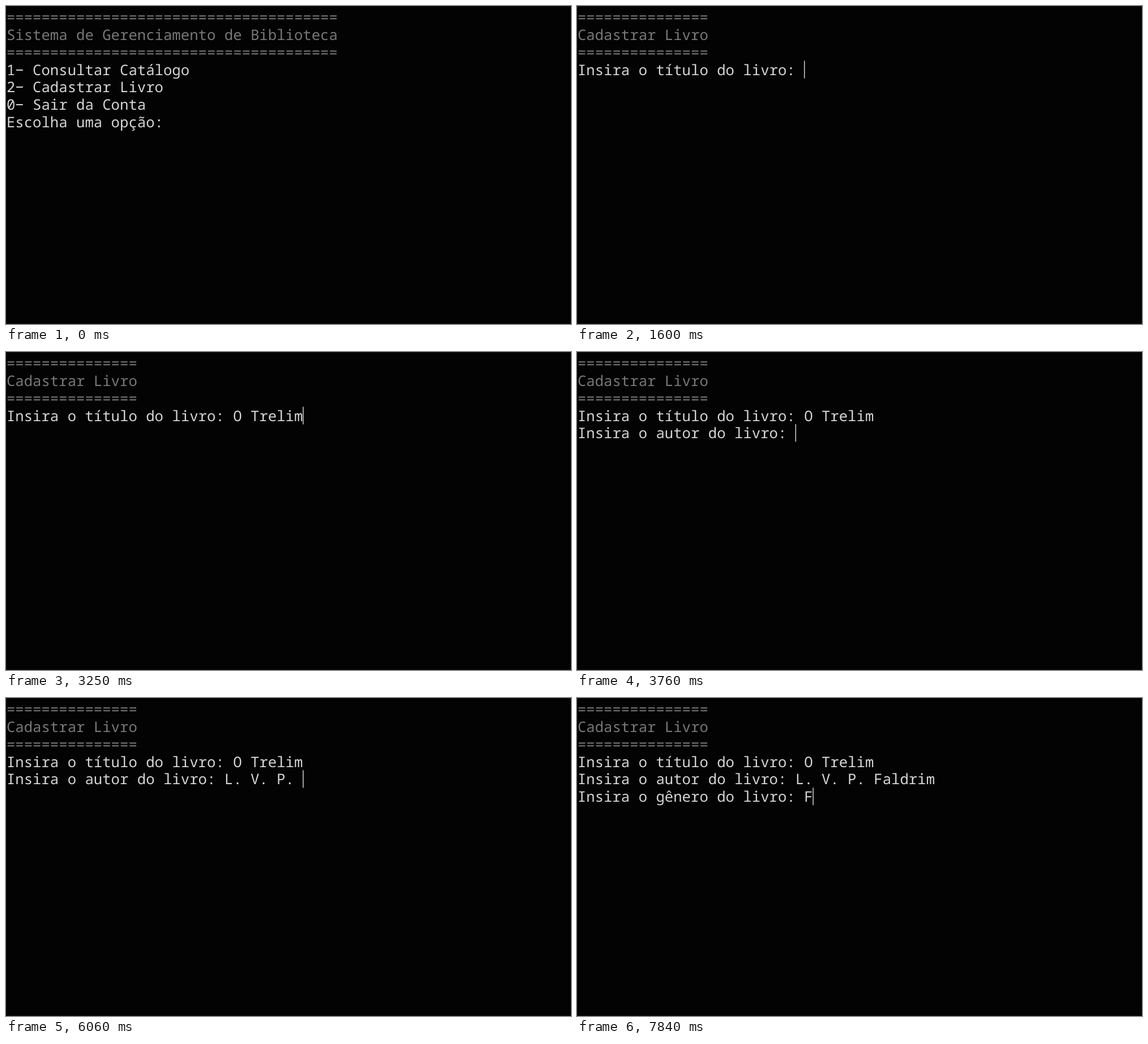
These frames come from a looping animation (998x561 px, 8 s). An HTML page:

```html
<!DOCTYPE html>
<html lang="pt">
<head>
<meta charset="utf-8">
<title>Biblioteca</title>
<style>
  html, body { margin: 0; width: 100%; height: 100%; overflow: hidden; background: #030303; }
  svg { display: block; width: 100%; height: 100%; }
  text {
    font: 25.667px "Noto Sans Mono", "DejaVu Sans Mono", monospace;
    white-space: pre;
    text-rendering: geometricPrecision;
    font-variant-ligatures: none;
    fill: #d6d6d6;
  }
  .dim { fill: #787878; }
</style>
</head>
<body>
<svg id="stage" viewBox="0 0 998 561">
  <rect width="998" height="561" fill="#030303"/>
  <rect x=".5" y=".5" width="997" height="560" fill="none" stroke="#121212"/>
</svg>
<script>
const LOOP = 8000, CELL = 15.4, ROW = 30.8, LEFT = 0.9, TOP = 4.2, BASELINE = 25;
const ROWS = 7, HEADER_ROWS = 3;
const MENU_END = 1600;

const stage = document.getElementById("stage");
const add = (tag, attrs) => {
  const el = document.createElementNS("http://www.w3.org/2000/svg", tag);
  for (const name in attrs) el.setAttribute(name, attrs[name]);
  return stage.appendChild(el);
};

const lines = Array.from({ length: ROWS }, (_, row) => add("text", {
  x: LEFT,
  y: TOP + row * ROW + BASELINE,
  class: row < HEADER_ROWS ? "dim" : "",
}));
const cursor = add("rect", { width: 1.4, height: 31, fill: "#dedede" });

const header = title => {
  const rule = "=".repeat(title.length);
  return [rule, title, rule];
};

const menu = [
  ...header("Sistema de Gerenciamento de Biblioteca"),
  "1\u2212 Consultar Catálogo",
  "2\u2212 Cadastrar Livro",
  "0\u2212 Sair da Conta",
];
const choice = { start: 0, prompt: "Escolha uma opção: ", value: "2", keys: [1300] };
const CHOICE_ENTER = 1550, BLINK_ON = 570, BLINK_OFF = 1150;

const form = header("Cadastrar Livro");
const fields = [
  {
    start: MENU_END, prompt: "Insira o título do livro: ", value: "O Trelim",
    keys: [2250, 2370, 2490, 2680, 2870, 3000, 3180, 3250],
  },
  {
    start: 3760, prompt: "Insira o autor do livro: ", value: "L. V. P. Faldrim",
    keys: [4390, 4730, 4820, 4910, 5290, 5385, 5480, 5730, 6060,
           6200, 6390, 6580, 6690, 6950, 7010, 7070],
  },
  { start: 7520, prompt: "Insira o gênero do livro: ", value: "F", keys: [7840] },
];

const typed = ({ prompt, value, keys }, t) =>
  prompt + value.slice(0, keys.filter(key => key <= t).length);

function screenAt(t) {
  if (t >= MENU_END) {
    const open = fields.filter(field => field.start <= t);
    return { text: [...form, ...open.map(field => typed(field, t))], cursorOn: true };
  }
  const text = [...menu, typed(choice, t)];
  if (t >= CHOICE_ENTER) text.push("");
  const cursorOn = (t >= BLINK_ON && t < BLINK_OFF) || t >= choice.keys[0];
  return { text, cursorOn };
}

function draw(t) {
  const { text, cursorOn } = screenAt(t);
  lines.forEach((line, row) => { line.textContent = text[row] || ""; });
  const row = text.length - 1;
  cursor.setAttribute("x", LEFT - 0.3 + text[row].length * CELL);
  cursor.setAttribute("y", TOP + row * ROW);
  cursor.setAttribute("visibility", cursorOn ? "visible" : "hidden");
}

const begin = performance.now();
function tick() {
  draw((performance.now() - begin) % LOOP);
  requestAnimationFrame(tick);
}
tick();
</script>
</body>
</html>
```
